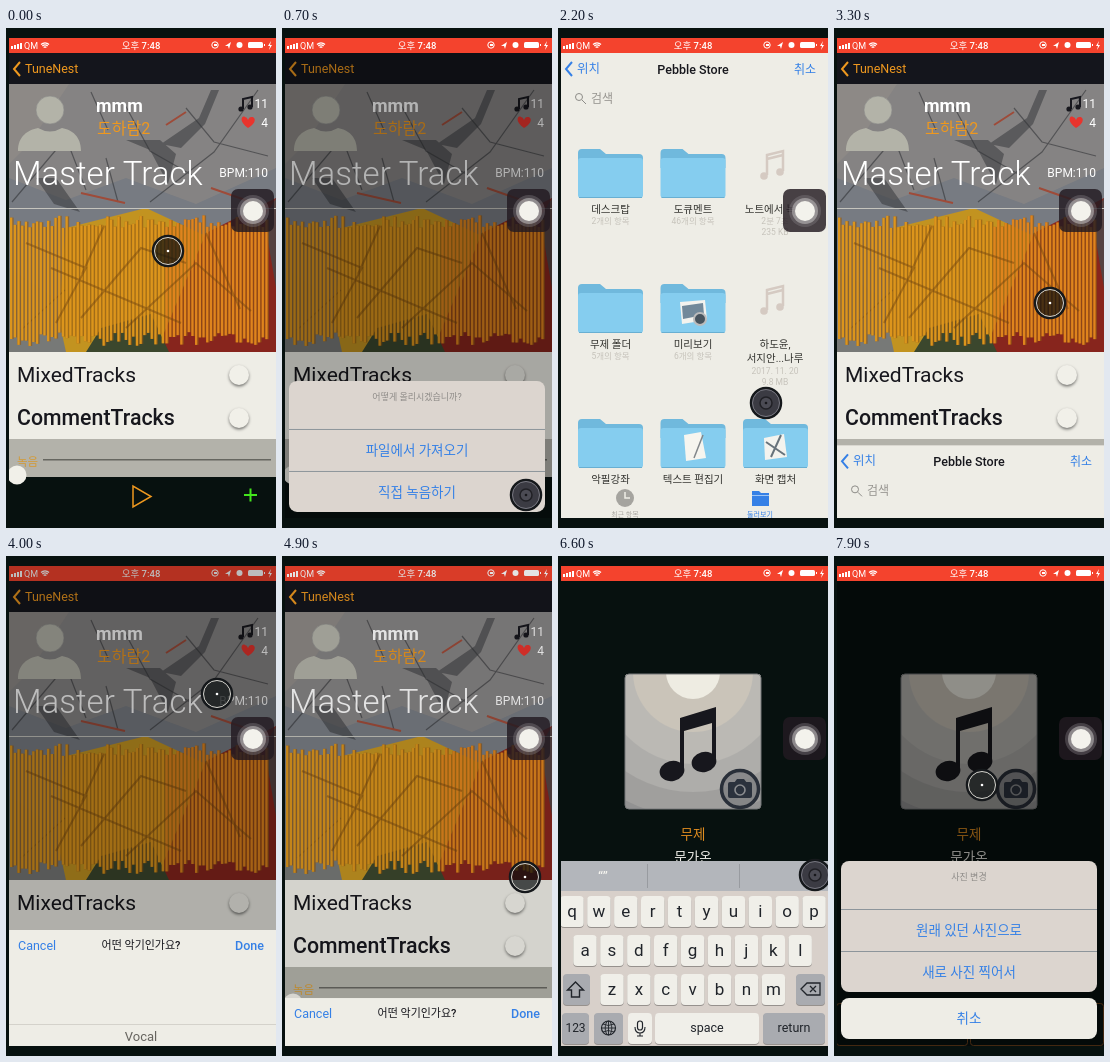
Recreate the animation shown at these times as an HTML page with a canvas. Size 270 by 500 pixels, loop 8000 ms.

```html
<!DOCTYPE html>
<html lang="ko">
<head>
<meta charset="utf-8">
<style>
html, body { margin: 0; width: 100%; height: 100%; overflow: hidden; background: #07100f; }
canvas { display: block; }
</style>
</head>
<body>
<canvas id="stage" width="270" height="500"></canvas>
<script>
const c = document.getElementById('stage').getContext('2d');
const FAMILY = 'Roboto, "Noto Sans CJK KR", "Noto Sans CJK", sans-serif';
const CREAM = '#eeede6', BLACK = '#07110f', ORANGE = '#ee981f', BLUE = '#3580e6', INK = '#17171d';

// ---- helpers ----
function rect(x, y, w, h, fill) { c.fillStyle = fill; c.fillRect(x, y, w, h); }
function paint(fill, stroke, width = 1) {
  if (fill) { c.fillStyle = fill; c.fill(); }
  if (stroke) { c.strokeStyle = stroke; c.lineWidth = width; c.stroke(); }
}
function round(x, y, w, h, r, fill, stroke, width) {
  c.beginPath(); c.roundRect(x, y, w, h, r); paint(fill, stroke, width);
}
function disc(x, y, r, fill, stroke, width) {
  c.beginPath(); c.arc(x, y, r, 0, 7); paint(fill, stroke, width);
}
function path(d, fill, stroke, width = 1) {
  const p = new Path2D(d);
  if (fill) { c.fillStyle = fill; c.fill(p); }
  if (stroke) { c.strokeStyle = stroke; c.lineWidth = width; c.stroke(p); }
}
function text(s, x, y, size, fill, align = 'left', weight = 400) {
  c.font = `${weight} ${size}px ${FAMILY}`;
  c.textAlign = align;
  c.fillStyle = fill;
  c.fillText(s, x, y);
}
function at(x, y, draw) { c.save(); c.translate(x, y); draw(); c.restore(); }
function dim(top, alpha) { if (alpha > 0) rect(0, top, 270, 500 - top, `rgba(0,0,0,${alpha})`); }

// Eased value from [time, value] stops.
function ease(t, stops) {
  let i = 0;
  while (i < stops.length - 1 && t >= stops[i + 1][0]) i++;
  const [t0, a] = stops[i], [t1, b] = stops[i + 1] || [t0 + 1, a];
  const p = Math.min(1, Math.max(0, (t - t0) / (t1 - t0)));
  return a + (b - a) * p * p * (3 - 2 * p);
}
function noise(n) { const v = Math.sin(n * 127.1 + 3) * 43758.5; return v - Math.floor(v); }

// ---- shared parts ----
function statusBar() {
  rect(0, 10, 270, 15, '#f4432d');
  for (let i = 0; i < 4; i++) rect(5 + i * 3, 18 - i, 2, 3 + i, '#fff');
  text('QM', 18, 21, 9, '#fff');
  for (const r of [2, 4, 6]) {
    c.beginPath(); c.arc(39, 21, r, -2.3, -.84); paint(null, '#fff', 1.3);
  }
  text('오후 7:48', 135, 21, 9.5, '#fff', 'center', 500);
  disc(209, 17, 3.2, null, '#fff');
  rect(208, 16, 3, 2, '#fff');
  path('M219 18l6-4-2 7-1-3z', '#fff');
  disc(233.5, 17, 3, '#fff');
  round(242, 14, 15, 6, 1.5, '#fff');
  rect(258, 16, 1, 2, '#fff');
  path('M265 13l-3 5h2l-1 4 3-5h-2z', '#fff');
}

function backLink(label, color) {
  path('M14 34l-6 7 6 7', null, color, 2);
  text(label, 19, 45, 12.5, color);
}

function darkNav() {
  rect(0, 25, 270, 31, '#14151c');
  backLink('TuneNest', ORANGE);
}

function sheet(offset, title, options) {
  if (offset >= 185) return;
  at(0, offset, () => {
    round(7, 305, 256, 131, 8, '#dcd5cf');
    text(title, 135, 324, 9, '#8e8b88', 'center');
    options.forEach((label, i) => {
      rect(7, 353 + i * 42, 256, 1, '#8d959b');
      text(label, 135, 379 + i * 42, 13.5, BLUE, 'center');
    });
    round(7, 442, 256, 41, 8, CREAM);
    text('취소', 135, 467, 13.5, BLUE, 'center', 500);
  });
}

// ---- track screen ----
function artwork() {
  rect(0, 56, 270, 268, '#858383');
  path('M3 150L60 172 120 150 190 176 270 140V324H3z', '#777b82');
  path('M3 56h60l-40 60-20 20z', '#8d8986');
  path('M60 200L140 180 215 215 170 324H50z', '#c29320');
  path('M200 205L270 170V324H150z', '#87251d');
  path('M3 240l45 30 12 54H3z', '#777977');
  path('M95 300l50-14 18 38H80z', '#3b472d');
  path('M258 190l12-20v90z', '#544242');
  path('M205 62l-12 28-38 26 20 4 24-24 14-34zM30 150l18 26 26 8-24-34zM120 112l24 10 18 34 8-30-16-14z', 'rgba(55,57,60,.55)');
  path('M118 75l26 48 42 24M252 62l-44 62-64 50M6 174l54-64 20 52M100 130l12 44M180 80l28 34 54 14M85 64l17 38M15 302l44-40', null, 'rgba(50,52,55,.6)', 1.2);
  path('M205 160l40 14M75 165l44 10M160 97l20-13', null, '#9e4b39', 2);
}

function waveform() {
  for (let i = 0; i < 70; i++) {
    const x = 4 + i * 3.7, top = 187 + noise(i) * 13, bottom = 304 + noise(i + 90) * 14;
    rect(x, top, 3.7, bottom - top, 'rgba(145,88,20,.65)');
    rect(x, top, 2.3, bottom - top, i < 42 ? '#dc951c' : '#df841d');
  }
  path('M20 215l60 25-30 55M75 290l60-70 45 15M120 300l70-65 55 48M45 240l130 55M98 198l-22 48M200 205l34 76', null, 'rgba(110,65,15,.45)', 2);
}

function toggle(y) {
  c.save();
  c.shadowColor = 'rgba(0,0,0,.5)';
  c.shadowBlur = 3;
  c.shadowOffsetY = 1.5;
  disc(233, y, 10, '#f1f0e9');
  c.restore();
}

function trackScreen() {
  artwork();
  darkNav();
  disc(44, 82, 14, '#b3b3a8', '#888', .6);
  path('M12 123c0-15 10-21 20-23q12 7 24 0c10 2 19 8 19 23z', '#b3b3a8');
  text('mmm', 90, 84, 18, '#fff', 'left', 700);
  text('도하람2', 91, 106, 16, ORANGE);
  path('M237 81v-10l9-2v10', null, INK, 2);
  disc(235, 81, 2.6, INK);
  disc(244, 79, 2.6, INK);
  text('11', 262, 80, 12, '#fff', 'right');
  path('M242 100c-10-7-6-13-3-11q2 0 3 3q1-3 3-3c4-1 7 5-3 11z', '#e8342d');
  text('4', 262, 99, 12, '#fff', 'right');
  text('Master Track', 7, 157, 33, '#fff', 'left', 300);
  text('BPM:110', 262, 149, 12, '#fff', 'right');
  rect(3, 180, 267, 1, '#c5c4bd');
  waveform();

  rect(0, 324, 270, 87, CREAM);
  text('MixedTracks', 11, 354, 21, INK);
  text('CommentTracks', 11, 397, 21.3, INK, 'left', 500);
  toggle(347);
  toggle(390);

  rect(0, 411, 270, 38, '#b3b2aa');
  text('녹음', 11, 438, 11.5, '#d39a36');
  rect(37, 431, 228, 1.5, '#666660');
  rect(0, 449, 270, 51, BLACK);
  disc(11, 447, 9.5, '#f1f0e9');
  path('M127 458v21l18-10.5z', null, ORANGE, 1.5);
  rect(238, 466, 13, 2, '#43e51c');
  rect(243.5, 460.5, 2, 13, '#43e51c');
}

// ---- file browser ----
function folder(x, y) {
  path(`M${x} ${y + 4}q0-4 4-4h18l6 5h33q4 0 4 4v10h-65z`, '#70b9dd');
  round(x, y + 9, 65, 40, 3, '#85cdef');
  rect(x + 1, y + 48, 63, 1, '#68afd2');
}

function songFile(y) {
  path(`M209 ${y + 28}v-20l16-4v20M209 ${y + 12}l16-4`, null, '#d5cac2', 2.5);
  disc(206, y + 29, 3.8, '#d5cac2');
  disc(222, y + 25, 3.8, '#d5cac2');
}

function browser() {
  const faint = '#c6c3bb';
  rect(0, 25, 270, 475, CREAM);
  backLink('위치', BLUE);
  text('Pebble Store', 135, 46, 12.5, INK, 'center', 500);
  text('취소', 258, 46, 12, BLUE, 'right');
  disc(21, 69, 3.5, null, '#8d8c88');
  path('M24 72l4 4', null, '#8d8c88');
  text('검색', 33, 75, 12, '#96948f');

  const names = [['데스크탑', '도큐멘트'], ['무제 폴더', '미리보기'], ['악필강좌', '텍스트 편집기', '화면 캡처']];
  names.forEach((row, r) => row.forEach((name, i) => {
    const x = 20 + i * 82.5, y = 121 + r * 135;
    folder(x, y);
    text(name, x + 32.5, y + 64, 10.5, '#33332f', 'center');
    if (r < 2) text(['2개의 항목', '46개의 항목', '5개의 항목', '6개의 항목'][r * 2 + i], x + 32.5, y + 75, 8.5, faint, 'center');
  }));
  songFile(119);
  text('노트에서 녹음', 217, 185, 10.5, '#33332f', 'center');
  text('2분 7초', 217, 196, 8.5, faint, 'center');
  text('235 KB', 217, 207, 8.5, faint, 'center');
  songFile(254);
  text('하도윤,', 217, 320, 10.5, '#33332f', 'center');
  text('서지안...나루', 217, 334, 10.5, '#33332f', 'center');
  text('2017. 11. 20', 217, 346, 8.5, faint, 'center');
  text('9.8 MB', 217, 357, 8.5, faint, 'center');

  path('M122 274l25-2 2 20-25 4z', '#f4f3ee');
  path('M124 278l21-3 1 12-21 4z', '#72899a');
  disc(142, 291, 6, '#48545e', '#bbb', 2);
  path('M126 407l17-3 5 26-20 3z', '#f6f5ef');
  path('M145 407l-9 23', null, '#81868a', 1.5);
  path('M206 410l20-4 3 23-22 3z', '#f4f3ee');
  path('M208 414l19 13M223 407l-10 22', null, '#68737b', 2);

  rect(0, 460, 270, 40, CREAM);
  disc(67, 470, 9, '#a5a49f');
  path('M67 464v6h5', null, CREAM, 1.5);
  path('M194 463h7l2 2h8v13h-17z', BLUE);
  rect(194, 467, 17, 1, '#9dc5f5');
  text('최근 항목', 67, 489, 7, '#aaa8a2', 'center');
  text('둘러보기', 202, 489, 7, BLUE, 'center');
}

// ---- instrument picker ----
function picker(offset) {
  if (offset >= 185) return;
  at(0, offset, () => {
    rect(0, 305, 270, 195, CREAM);
    text('Cancel', 12, 325, 12.5, BLUE);
    text('어떤 악기인가요?', 135, 324, 11, INK, 'center', 500);
    text('Done', 258, 325, 12.5, BLUE, 'right', 500);
    ['Vocal', 'Guitar', 'Bass', 'Drum'].forEach((name, i) =>
      text(name, 135, 416 + i * 23, 13 - i * .7, ['#66645f', '#96948e', '#b3b1aa', '#cecbc3'][i], 'center'));
    rect(0, 399, 270, .7, '#c9c7c0');
    rect(0, 424, 270, .7, '#c9c7c0');
  });
}

// ---- upload screen ----
function cover() {
  c.save();
  c.beginPath(); c.roundRect(67, 165, 136, 135, 4); c.clip();
  rect(67, 165, 136, 135, '#929292');
  [[145, '#a09f9d'], [120, '#aeadaa'], [92, '#bbb9b4'], [60, '#cac4b9'], [27, '#eeece2']].forEach(([r, fill]) => disc(135, 163, r, fill));
  c.restore();
  round(67, 165, 136, 135, 4, null, '#77797a');
  path('M122 209l36-11v54h-4v-38l-28 8v41h-4z', INK);
  for (const [x, y] of [[114, 262], [146, 253]]) {
    c.beginPath(); c.ellipse(x, y, 12.5, 10, -.25, 0, 7); paint(INK);
  }
  disc(182, 280, 18.5, 'rgba(125,126,128,.75)', '#292f39', 3.5);
  round(170, 273, 24, 16, 2, '#2b323d');
  path('M176 274l3-4h7l3 4z', '#2b323d');
  disc(182, 281, 5, null, '#8b8d90', 1.6);
}

function uploadScreen(lift, caret) {
  rect(0, 25, 270, 475, BLACK);
  at(0, -lift, () => {
    darkNav();
    rect(0, 56, 270, 1, '#54585a');
    cover();
    text('무제', 135, 330, 13.5, '#e18d20', 'center');
    if (caret) rect(148, 317, 2, 16, '#4a5785');
    text('문가온', 135, 353, 13.5, '#efeee8', 'center');
    text('BPM : 120', 94, 374, 12.8, '#efeee8');
    text('업로드 하시겠습니까?', 135, 454, 20.5, ORANGE, 'center');
    round(2.5, 494.5, 131, 42, 3, null, '#70421d');
    round(136.5, 494.5, 133, 42, 3, null, '#70421d');
  });
}

function key(x, y, w, label, special, size = 17) {
  round(x, y + 1, w, 31, 4, '#96918d');
  round(x, y, w, 31, 4, special ? '#a9abb0' : '#f0efe9');
  text(label, x + w / 2, y + 15 + size * .35, size, '#20242a', 'center');
}

function keyboard(offset) {
  if (offset >= 185) return;
  at(0, offset, () => {
    rect(0, 305, 270, 195, '#d8d0ca');
    rect(0, 305, 270, 30, '#b3b6bb');
    rect(89, 308, 1, 24, '#989ba0');
    rect(181, 308, 1, 24, '#989ba0');
    text('“”', 45, 325, 13, '#f4f3ee', 'center', 500);
    [['qwertyuiop', 14], ['asdfghjkl', 27], ['zxcvbnm', 54]].forEach(([row, x], r) =>
      [...row].forEach((ch, i) => key(x - 11.7 + i * 26.9, 340 + r * 39, 23.4, ch)));
    key(5, 418, 27, '', true);
    path('M17.5 426l8 8h-4v7h-8v-7h-4z', null, '#20242a', 1.4);
    key(238, 418, 29, '', true);
    path('M243 433l6-6h13v12h-13zM252 430l6 6M258 430l-6 6', null, '#20242a', 1.3);
    key(4, 457, 27, '123', true, 12);
    key(36, 457, 29, '', true);
    disc(50.5, 472, 7, null, '#20242a', 1.2);
    path('M43 472h15M50.5 465v14M45 468q5 3 11 0M45 476q5-3 11 0', null, '#20242a', .9);
    c.beginPath(); c.ellipse(50.5, 472, 3.3, 7, 0, 0, 7); paint(null, '#20242a', .9);
    key(70, 457, 24, '');
    round(79.5, 465, 5, 9, 2.5, null, '#20242a', 1.2);
    path('M77 471q0 6 5 6t5-6M82 477v3M79 480h6', null, '#20242a', 1.1);
    key(97, 457, 104, 'space', false, 12.5);
    key(205, 457, 62, 'return', true, 12.5);
  });
}

// ---- overlays ----
function assistiveTouch() {
  round(225, 161, 43, 43, 7, 'rgba(35,26,34,.82)');
  disc(247, 183, 16, 'rgba(130,125,130,.4)');
  disc(247, 183, 13, 'rgba(190,186,186,.6)');
  disc(247, 183, 10, '#f3f2ec');
}

function pointer(t) {
  const route = [[0, 162, 223], [500, 244, 467], [800, 244, 467], [1100, 208, 375], [2500, 208, 375],
    [2900, 216, 275], [3400, 216, 275], [4000, 211, 138], [4500, 243, 321], [5200, 243, 321],
    [5800, 257, 319], [6700, 257, 319], [7200, 182, 232], [7500, 182, 232], [7900, 148, 229]];
  const x = ease(t, route.map(p => [p[0], p[1]])), y = ease(t, route.map(p => [p[0], p[2]]));
  const taps = [[500, 800], [1100, 2500], [2900, 3200], [4500, 4800], [6400, 6700], [7200, 7500]];
  const down = taps.some(([a, b]) => t >= a && t < b);
  disc(x, y, 15, down ? '#3b3b43' : 'rgba(10,14,16,.7)', '#15181b', 2.5);
  disc(x, y, 13.5, null, down ? '#777780' : '#d5d4ce', 1);
  if (down) disc(x, y, 6, '#4b4b54', '#202025', 1.5);
  disc(x, y, 1.3, down ? '#17171b' : '#fff');
}

function draw(t) {
  const addSheet = ease(t, [[500, 185], [800, 0], [1100, 0], [1300, 144], [1400, 185]]);
  const files = ease(t, [[1400, 465], [1800, 0], [3000, 0], [3400, 465]]);
  const wheel = ease(t, [[3800, 185], [4000, 69], [4200, 0], [4700, 0], [5000, 185]]);
  const push = ease(t, [[5000, 270], [5400, 0]]);
  const lift = ease(t, [[5800, 0], [6200, 47]]);
  const keys = ease(t, [[5800, 185], [6200, 0], [6700, 0], [7000, 185]]);
  const photoSheet = ease(t, [[7300, 185], [7700, 0]]);

  rect(0, 0, 270, 500, BLACK);
  c.save();
  c.beginPath(); c.rect(3, 10, 267, 480); c.clip();
  if (push > 0) {
    at((push - 270) * .3, 0, trackScreen);
    dim(25, .4 * (1 - addSheet / 185));
    sheet(addSheet, '어떻게 올리시겠습니까?', ['파일에서 가져오기', '직접 녹음하기']);
    if (files < 465) at(0, files, browser);
  }
  if (push < 270) {
    at(push, 0, () => uploadScreen(lift, t >= 5700 && t < 6300));
    keyboard(keys);
    dim(25, .4 * (1 - photoSheet / 185));
    sheet(photoSheet, '사진 변경', ['원래 있던 사진으로', '새로 사진 찍어서']);
  }
  statusBar();
  dim(10, .42 * (1 - wheel / 185));
  picker(wheel);
  assistiveTouch();
  pointer(t);
  c.restore();
}

function tick(now) {
  draw(Math.floor(now % 8000 / 100) * 100);
  requestAnimationFrame(tick);
}
tick(performance.now());
</script>
</body>
</html>
```
